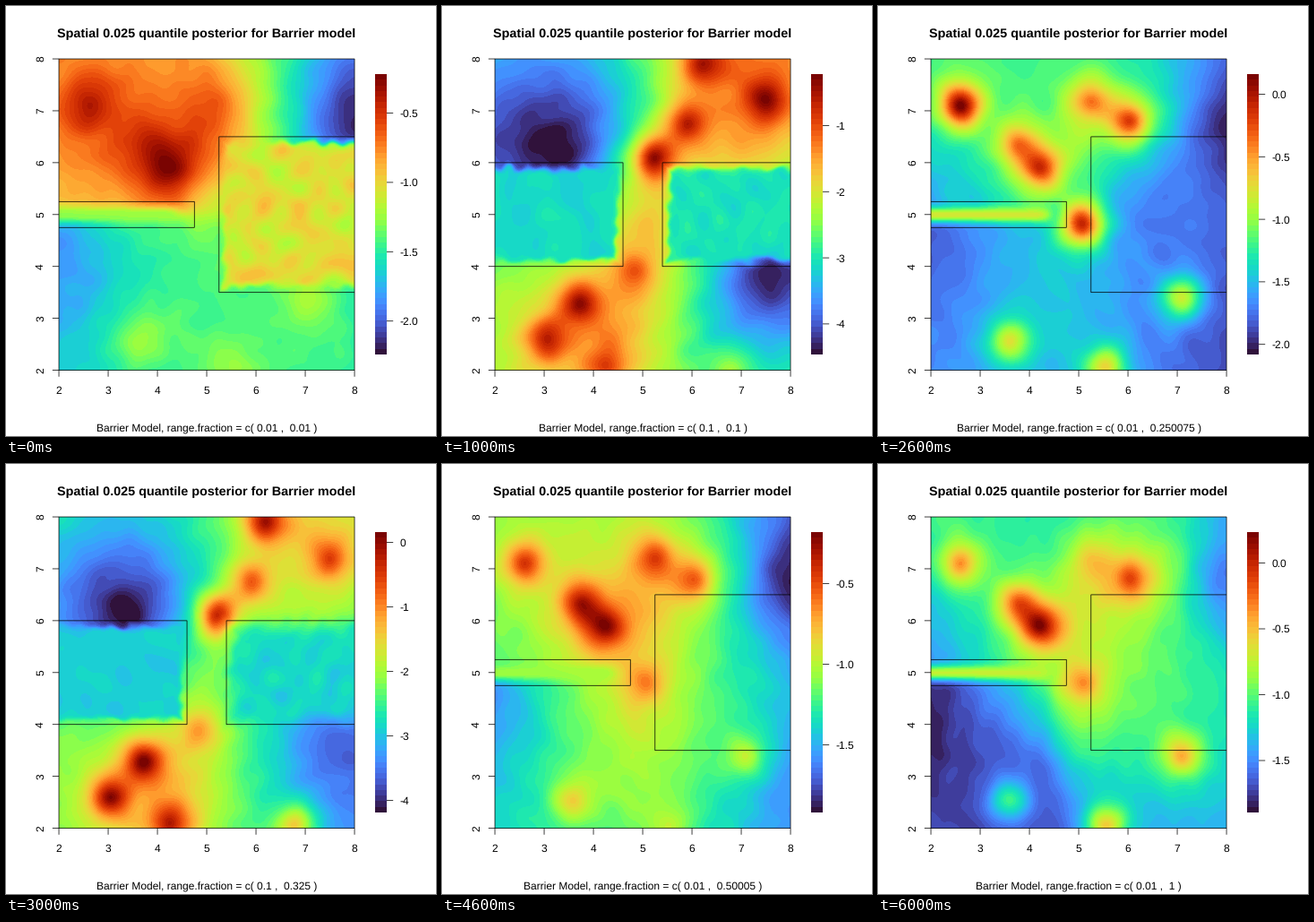
Recreate the animation shown at these times as a matplotlib script. Size 480 by 480 pixels, loop 7 s.

```python
import numpy as np
import matplotlib.pyplot as plt
from matplotlib.animation import FuncAnimation
from matplotlib.patches import Rectangle

SIZE, DPI = 480, 100
LEFT, RIGHT, TOP, BOTTOM = 59.04, 389.04, 59.04, 406.56
BAR_LEFT, BAR_RIGHT, BAR_TOP, BAR_BOTTOM = 412, 425, 76, 389
LEVELS = 50
plt.rcParams.update({"font.family": "Liberation Sans", "text.hinting": "none"})


def px(x):
    return LEFT + (x - 2) * (RIGHT - LEFT) / 6


def py(y):
    return BOTTOM - (y - 2) * (BOTTOM - TOP) / 6


NX, NY = 330, 348
gx, gy = np.meshgrid(2 + 6 * (np.arange(NX) + 0.5) / NX,
                     8 - 6 * (np.arange(NY) + 0.5) / NY)
GRID = np.column_stack([gx.ravel(), gy.ravel()])


def step(d, width):
    return 0.5 + 0.5 * np.tanh(d / width)


def ripple(seed, low=4, high=13, count=30):
    """Random waves with unit spread, for the uneven mesh look."""
    rng = np.random.default_rng(seed)
    total = np.zeros_like(gx)
    for _ in range(count):
        k = rng.uniform(low, high)
        turn, phase = rng.uniform(0, 2 * np.pi, 2)
        total += np.cos(k * (gx * np.cos(turn) + gy * np.sin(turn)) + phase)
    return total / np.sqrt(count / 2)


def distance(a, b):
    return np.hypot(a[:, None, 0] - b[None, :, 0], a[:, None, 1] - b[None, :, 1])


def spline(pts, values):
    """Smooth surface through a few key points."""
    def kernel(p):
        return np.hypot(distance(p, pts), 0.35)
    n = len(pts)
    m = np.ones((n + 1, n + 1))
    m[:n, :n] = kernel(pts)
    m[n, n] = 0
    w = np.linalg.solve(m, np.append(values, 0))
    return lambda p: kernel(p) @ w[:n] + w[n]


class StripLayout:
    """A thin wall from the west and a large one from the east."""
    walls = [(1, 4.75, 4.75, 5.25), (5.25, 9, 3.5, 6.5)]
    keys = np.array([
        (2, 8), (4.8, 8), (6.95, 7), (7.8, 6.8), (2, 5.4), (5, 6.3), (6.1, 5.2),
        (7.8, 5), (4.8, 4.1), (4.3, 3), (7.9, 2.6), (2, 4.5), (2, 2.2)])
    peaks = np.array([
        (2.6, 7.1), (3.75, 6.35), (4.22, 5.9), (5.25, 7.2), (6.05, 6.8),
        (5.08, 4.82), (3.6, 2.55), (5.55, 2.05), (7.1, 3.4)])

    @staticmethod
    def warp(p):
        # Widens the thin wall so that its two sides lie far apart.
        x, y = p.T
        return np.column_stack([x, y + 0.8 * step(4.55 - x, 0.3) * np.tanh((y - 5) / 0.12)])

    @staticmethod
    def reach(p, peaks):
        # The thin wall stops a peak from spreading across it.
        x, y = p.T[:, :, None]
        side = np.sign(peaks[:, 1] - 5)
        return 1 - step(4.6 - x, 0.15) * step((5 - y) * side, 0.12)


class GateLayout:
    """Two walls with a gap between them."""
    walls = [(1, 4.6, 4, 6), (5.4, 9, 4, 6)]
    keys = np.array([
        (2, 8), (2, 6.2), (3.4, 6.1), (4.4, 7.2), (6.8, 8), (7.2, 6.2), (5.05, 5),
        (2, 4), (2, 2.1), (4.5, 2.8), (5.5, 3), (7.5, 3.9), (6.1, 2.5), (8, 2.2)])
    peaks = np.array([
        (6.2, 7.9), (7.5, 7.2), (5.9, 6.75), (5.22, 6.1), (4.85, 3.9),
        (3.72, 3.3), (3.05, 2.6), (4.25, 2.1), (6.8, 2.05)])

    @staticmethod
    def warp(p):
        return p

    @staticmethod
    def reach(p, peaks):
        return 1


def surface(layout, levels, heights, width):
    """Background through the key levels, plus bells that reach the heights."""
    def bells(p):
        fall = np.exp(-(distance(p, layout.peaks) / width) ** 1.7)
        return fall * layout.reach(p, layout.peaks)
    base = spline(layout.warp(layout.keys), np.array(levels) / 100)
    rest = np.array(heights) / 100 - base(layout.warp(layout.peaks))
    amps = np.linalg.solve(bells(layout.peaks), rest)
    return (base(layout.warp(GRID)) + bells(GRID) @ amps).reshape(gx.shape)


def fill_wall(z, wall, flat, rough, soft, seed):
    x0, x1, y0, y1 = wall
    d = np.minimum(np.minimum(gx - x0, x1 - gx), np.minimum(gy - y0, y1 - gy))
    m = step(d - 0.12 + 0.025 * ripple(seed + 50, 8, 22), soft)
    return z * (1 - m) + m * (flat + rough * ripple(seed))


def fill_spine(z, level):
    """Bright ridge along the middle of the thin wall."""
    m = step(4.4 - gx, 0.15) * np.exp(-((gy - 5) / 0.14) ** 2)
    return z * (1 - m) + m * level


scenes = []


def scene(label, ticks, layout, levels, heights, width=0.42, spine=None, fills=()):
    """Levels and heights are percentages of the colour scale."""
    seed = 10 * len(scenes)
    z = surface(layout, levels, heights, width) + 0.007 * ripple(seed)
    if spine:
        z = fill_spine(z, spine / 100)
    for wall, flat, rough, soft in fills:
        seed += 1
        z = fill_wall(z, layout.walls[wall], flat, rough, soft, seed)
    scenes.append((label, ticks, layout.walls, np.clip(z, 0, 1)))


# Ticks: first value, its height in pixels, step, spacing, count.
scene("0.01 ,  0.01", (-0.5, 119.5, 0.5, 77.4, 4), StripLayout,
      (72, 70, 27, 5, 66, 78, 45, 25, 41, 40, 38, 20, 28),
      (93, 92, 100, 79, 55, 48, 50, 49, 52), width=0.55, spine=48,
      fills=[(1, 0.59, 0.028, 0.07)])
scene("0.1 ,  0.1", (-1, 133.5, 1, 73.8, 4), GateLayout,
      (23, 10, 0, 24, 74, 66, 63, 46, 52, 68, 52, 2, 38, 32),
      (95, 100, 92, 97, 81, 97, 93, 85, 50),
      fills=[(0, 0.315, 0.012, 0.06), (1, 0.335, 0.014, 0.06)])
scene("0.01 ,  0.250075", (0, 98.5, 0.5, 69.8, 5), StripLayout,
      (40, 40, 28, 5, 24, 46, 19, 14, 28, 28, 9, 11, 18),
      (100, 78, 88, 77, 84, 90, 60, 62, 57), spine=58)
scene("0.1 ,  0.325", (0, 87.5, 1, 72, 5), GateLayout,
      (32, 20, 0, 26, 60, 52, 46, 44, 48, 62, 46, 13, 36, 18),
      (95, 85, 80, 92, 72, 100, 97, 93, 64),
      fills=[(0, 0.29, 0.008, 0.06), (1, 0.31, 0.016, 0.2)])
scene("0.01 ,  0.50005", (-0.5, 133.5, 0.5, 90, 3), StripLayout,
      (48, 54, 32, 4, 42, 66, 46, 27, 56, 47, 20, 20, 31),
      (86, 96, 100, 84, 80, 75, 63, 54, 54), spine=50)
scene("0.01 ,  0.750025", (0, 88.5, 0.5, 95.6, 4), StripLayout,
      (40, 36, 28, 8, 30, 46, 30, 20, 36, 28, 13, 5, 16),
      (98, 92, 100, 52, 73, 60, 58, 58, 64), spine=52)
scene("0.01 ,  1", (0, 110.5, 0.5, 73.5, 4), StripLayout,
      (38, 38, 45, 18, 22, 56, 46, 35, 45, 12, 28, 3, 8),
      (71, 82, 100, 66, 84, 73, 40, 63, 68), spine=55)


fig = plt.figure(figsize=(SIZE / DPI, SIZE / DPI), dpi=DPI, facecolor="white")
ax = fig.add_axes([0, 0, 1, 1])
ax.axis("off")
THIN = 0.75 * 72 / DPI
look = dict(cmap=plt.get_cmap("turbo", LEVELS), vmin=0, vmax=1,
            interpolation="nearest", aspect="auto")


def text(x, y, s, size=12, **kw):
    return ax.text(x, y, s, fontsize=size * 72 / DPI, va="baseline",
                   rotation_mode="anchor", **kw)


def line(xs, ys):
    return ax.plot(xs, ys, color="black", lw=THIN, solid_capstyle="butt",
                   snap=False, zorder=4)[0]


def outline(x, y, w, h):
    return ax.add_patch(Rectangle((x, y), w, h, fill=False, ec="black",
                                  lw=THIN, snap=False, zorder=4))


field = ax.imshow(scenes[0][3], extent=(59, 389, 407, 59), **look)
ramp = (np.arange(LEVELS)[::-1, None] + 0.5) / LEVELS
ax.imshow(ramp, extent=(BAR_LEFT, BAR_RIGHT, BAR_BOTTOM, BAR_TOP), **look)
ax.set_xlim(0, SIZE)
ax.set_ylim(SIZE, 0)

plot_box = outline(LEFT, TOP, RIGHT - LEFT, BOTTOM - TOP)
for v in range(2, 9):
    line([px(v)] * 2, [BOTTOM, BOTTOM + 7.2])
    line([LEFT - 7.2, LEFT], [py(v)] * 2)
    text(px(v), 433, str(v), ha="center")
    text(42, py(v), str(v), ha="center", rotation=90)

text(224, 35, "Spatial 0.025 quantile posterior for Barrier model", 14.4,
     ha="center", weight="bold")
caption = text(224.3, 476, "", ha="center")
wall_lines = [outline(0, 0, 1, 1) for _ in range(2)]
for box in wall_lines:
    box.set_clip_path(plot_box)
marks = [(line([], []), text(439.4, 0, "", ha="left")) for _ in range(5)]


def draw(i):
    label, (first, y0, gap, space, count), walls, z = scenes[i]
    field.set_data(z)
    caption.set_text(f"Barrier Model, range.fraction = c( {label} )")
    for box, (x0, x1, low, high) in zip(wall_lines, walls):
        box.set_bounds(px(x0), py(high), px(x1) - px(x0), py(low) - py(high))
    for k, (tick, name) in enumerate(marks):
        y, v = y0 + k * space, first - k * gap
        tick.set_data([BAR_RIGHT, BAR_RIGHT + 7.2], [y, y])
        name.set_y(y + 4.3)
        name.set_text(f"{v:.1f}" if gap < 1 else f"{v:.0f}")
        tick.set_visible(k < count)
        name.set_visible(k < count)
    return [field, caption]


anim = FuncAnimation(fig, draw, frames=len(scenes), interval=1000,
                     repeat=True, repeat_delay=0, blit=False)
plt.show()
```
